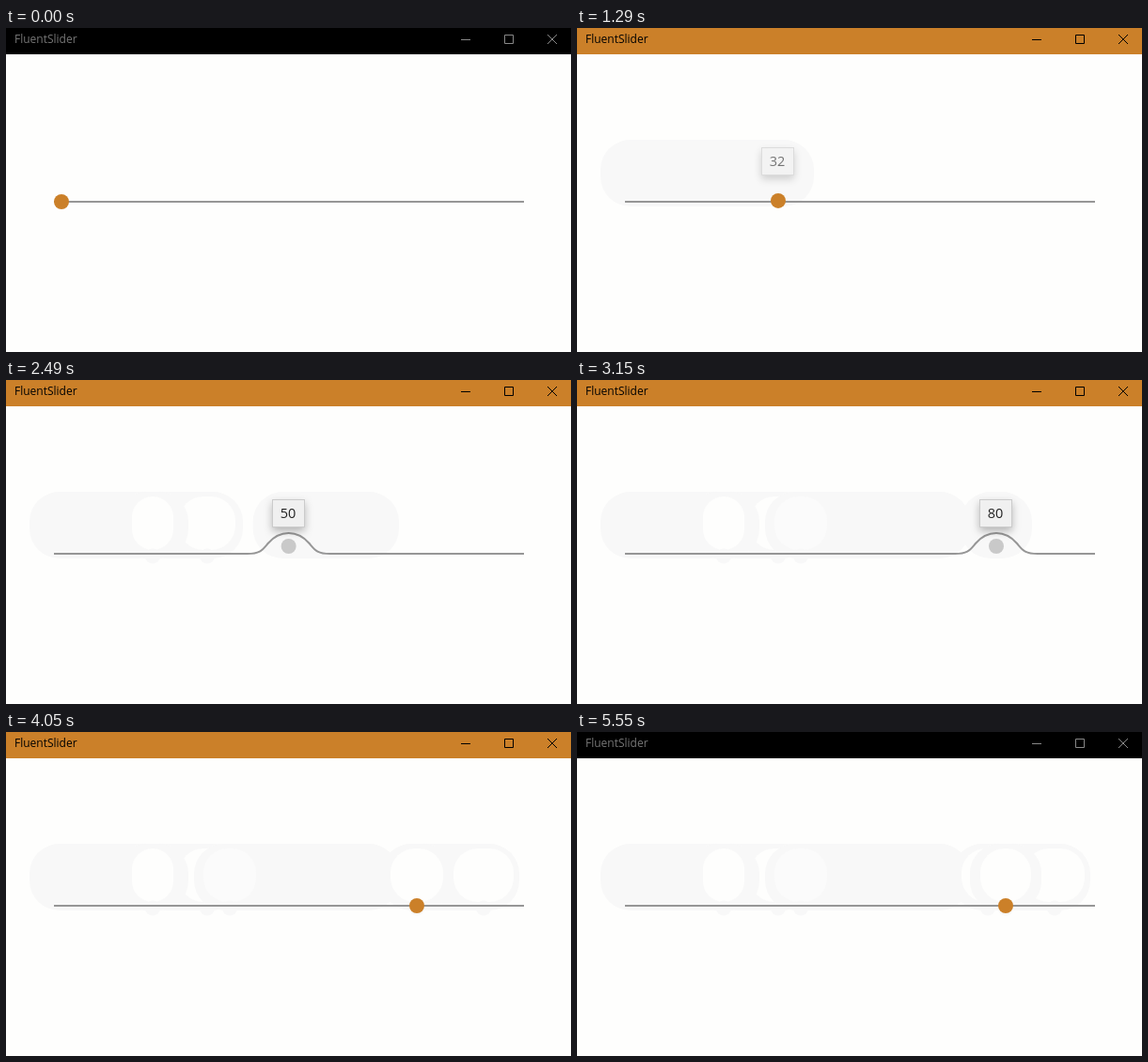
Write an HTML page that moves like this. It is 601 px wide and 345 px high and loops after 5610 ms.

```html
<!DOCTYPE html>
<html lang="en">
<head>
<meta charset="utf-8">
<title>FluentSlider</title>
<style>
  html, body { margin: 0; width: 100%; height: 100%; overflow: hidden; background: #fefefd; }
  svg { display: block; width: 100%; height: 100%; }
  text { font-family: "Open Sans", "Noto Sans", sans-serif; }
</style>
</head>
<body>
<svg viewBox="0 0 601 345">
  <defs>
    <filter id="shadow" x="-80%" y="-80%" width="260%" height="280%">
      <feDropShadow dx="0" dy="4" stdDeviation="4.5" flood-color="#000" flood-opacity=".27"/>
    </filter>
  </defs>
  <rect width="601" height="345" fill="#fefefd"/>
  <rect id="bar" width="601" height="28"/>
  <text id="title" x="9" y="16" font-size="12">FluentSlider</text>
  <path id="buttons" fill="none" d="M484 12.5h10M530.5 7.5h9v9h-9zM576 7l10 10M586 7l-10 10"/>
  <g id="trail"></g>
  <path id="track" fill="none" stroke="#969696" stroke-width="2"/>
  <circle id="thumb" r="8"/>
  <g id="tip">
    <rect id="tipBox" y="127.5" height="29" fill="#f0f0f0" stroke="#cbcbcb" filter="url(#shadow)"/>
    <text id="tipText" y="147" font-size="14.5" fill="#222" text-anchor="middle"></text>
  </g>
</svg>
<script>
const LOOP = 5610, LEFT = 59, SPAN = 484, LINE_Y = 185;
const ACCENT = '#cb8029', PAPER = '#fefefd', STAIN = '#f8f8f8';
const $ = id => document.getElementById(id);
const clamp = v => Math.min(1, Math.max(0, v));
const smooth = p => p * p * (3 - 2 * p);

// Each press: start, end, path of [time, x], and the patch wiped clean when the tip is gone.
const presses = [
  { down: 655, up: 1222, path: [[740, 59], [1140, 214]], wipe: 30 },
  { down: 1545, up: 1650, path: [[1545, 156]], wipe: 22 },
  { down: 1920, up: 2675, path: [[2100, 333], [2280, 380], [2340, 380], [2620, 238]], wipe: 28, tone: '#fbfbfb' },
  { down: 3020, up: 3390, path: [[3155, 446], [3330, 508]], wipe: 32 },
  { down: 3770, up: 3850, path: [[3770, 437]], wipe: 28 },
  { down: 4280, up: 4420, path: [[4280, 456]], wipe: 27 },
  { down: 4600, up: 4755, path: [[4600, 456]], wipe: 27 }
];

function set(el, attrs) {
  for (const key in attrs) el.setAttribute(key, attrs[key]);
}

function add(tag, attrs) {
  const el = document.createElementNS('http://www.w3.org/2000/svg', tag);
  set(el, attrs);
  return $('trail').appendChild(el);
}

for (const press of presses) {
  const end = press.path[press.path.length - 1][1];
  press.band = add('rect', { y: 119, height: 71, rx: 32, fill: STAIN });
  press.patch = add('rect', {
    x: end - press.wipe, y: 124, width: press.wipe * 2, height: 57,
    rx: Math.min(26, press.wipe), fill: press.tone || PAPER
  });
  press.dot = add('circle', { cx: end, cy: 187.5, r: 8, fill: STAIN });
}

function xAt(path, t) {
  let x = path[0][1];
  for (let i = 1; i < path.length; i++) {
    const [t0, x0] = path[i - 1], [t1, x1] = path[i];
    if (t >= t0) x = x0 + (x1 - x0) * smooth(clamp((t - t0) / (t1 - t0)));
  }
  return x;
}

const tipIn = age => clamp((age - 12) / 100);

function drawTrail(press, t) {
  const end = Math.min(t, press.up);
  const xs = press.path.filter(p => p[0] <= end).map(p => p[1]);
  xs.push(xAt(press.path, end));
  const low = Math.min(...xs) - 38, high = Math.max(...xs) + 38;
  const x = Math.max(25, low);
  set(press.band, { x, width: high - x, visibility: tipIn(end - press.down) > .5 ? 'visible' : 'hidden' });
  set(press.patch, { visibility: t > press.up + 175 ? 'visible' : 'hidden' });
  set(press.dot, { visibility: t > press.up + 130 ? 'visible' : 'hidden' });
}

function trackPath(x, height) {
  const y = n => (LINE_Y - n * height).toFixed(2);
  const px = n => (x + n).toFixed(2);
  if (height <= 0) return `M51 ${LINE_Y}H551`;
  return `M51 ${LINE_Y}H${px(-44)}` +
    `C${px(-30)} ${y(0)} ${px(-28)} ${y(4)} ${px(-22)} ${y(11)}` +
    `S${px(-10)} ${y(22)} ${px(0)} ${y(22)}` +
    `S${px(16)} ${y(18)} ${px(22)} ${y(11)}` +
    `S${px(30)} ${y(0)} ${px(44)} ${y(0)}H551`;
}

function draw(t) {
  const active = t >= 630 && t < 5550;
  set($('bar'), { fill: active ? ACCENT : '#000' });
  set($('title'), { fill: active ? '#000' : '#777' });
  set($('buttons'), { stroke: active ? '#000' : '#888' });

  presses.forEach(press => drawTrail(press, t));

  let x = LEFT, bump = 0, lift = 0, tip = 0;
  let color = t >= 240 && t < 655 ? '#171717' : ACCENT;
  const press = presses.filter(p => t >= p.down).pop();
  if (press) {
    x = xAt(press.path, Math.min(t, press.up));
    if (t < press.up) {
      const age = t - press.down;
      bump = 1 - (1 - clamp(age / 75)) ** 2;
      lift = 1 - (1 - clamp(age / 80)) ** 3;
      tip = tipIn(age);
      color = '#c9c9c9';
    } else {
      const age = t - press.up, p = clamp(age / 190);
      bump = 1 - clamp(age / 65);
      lift = (1 - p) * Math.cos(3.74 * p);
      tip = tipIn(press.up - press.down) * (1 - clamp(age / 180));
    }
  }

  set($('track'), { d: trackPath(x, bump) });
  set($('thumb'), { cx: x, cy: LINE_Y - 8 * lift, fill: color });
  const label = String(Math.round((x - LEFT) / SPAN * 100));
  const width = 18 + 8 * label.length;
  set($('tip'), { opacity: tip });
  set($('tipBox'), { x: Math.round(x - width / 2) - .5, width });
  set($('tipText'), { x: Math.round(x) - 1 });
  $('tipText').textContent = label;
}

const start = performance.now();
function tick() {
  draw((performance.now() - start) % LOOP);
  requestAnimationFrame(tick);
}
tick();
</script>
</body>
</html>
```
